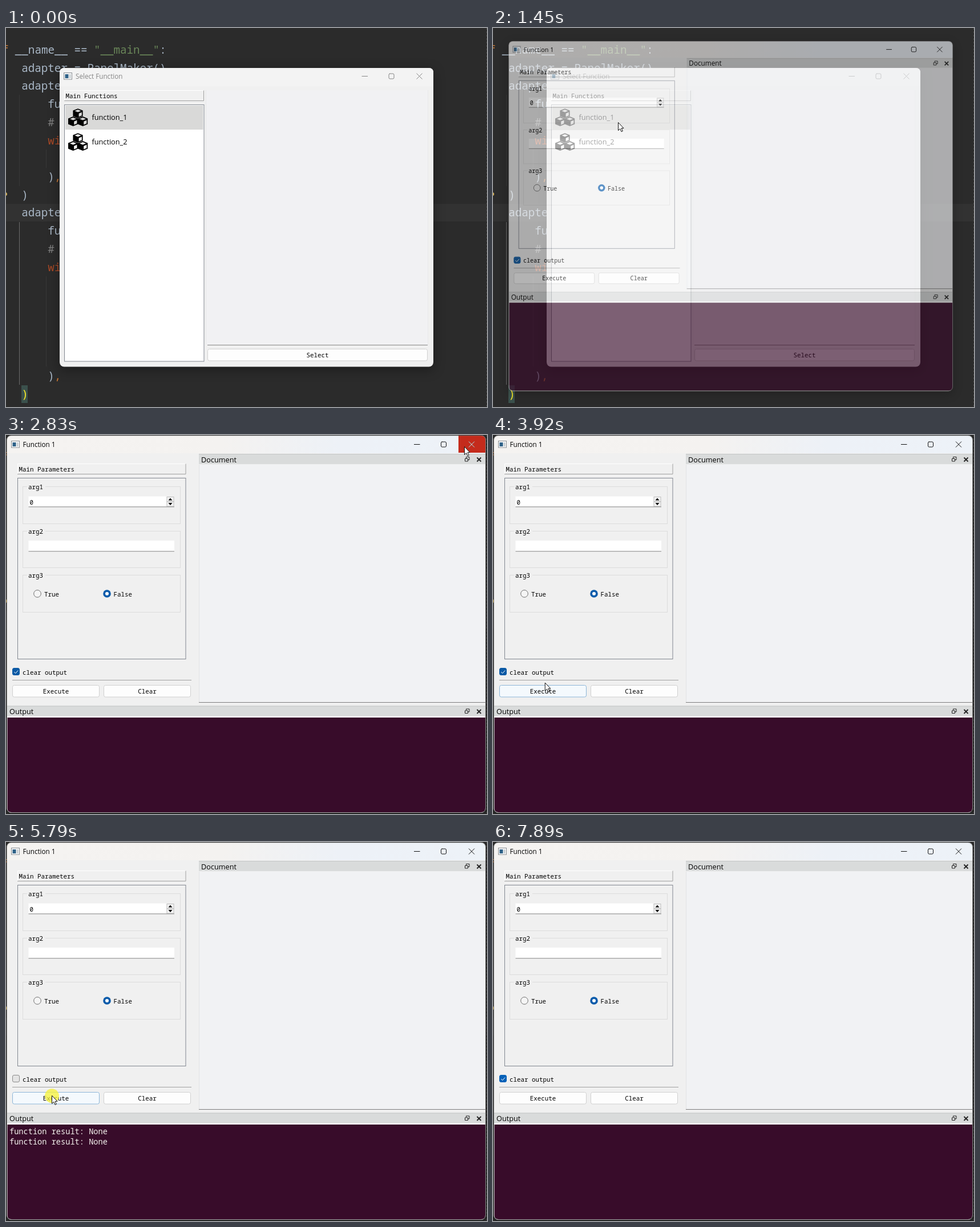
An HTML page that plays this animation: 843 px wide and 664 px high, repeating every 8 s.

```html
<!DOCTYPE html>
<html lang="en">
<head>
<meta charset="utf-8">
<title>Function picker</title>
<style>
  html, body { margin: 0; width: 100%; height: 100%; overflow: hidden; background: #2b2b2b; }
  svg { display: block; }
  text { white-space: pre; }
  .code { font: 19.2px "Noto Sans Mono", monospace; fill: #a9b7c6; }
  .mono { font: 10.83px "Noto Sans Mono", monospace; fill: #000; }
  .out { font: 13.65px "Noto Sans Mono", monospace; fill: #f4f2ee; }
  .title { font: 11.7px "Open Sans", sans-serif; }
  .ui { font: 12.7px "Open Sans", sans-serif; fill: #000; }
  .mid { text-anchor: middle; }
  .win { filter: drop-shadow(0 5px 10px rgba(0, 0, 0, .35)); }
</style>
</head>
<body>
<svg id="stage" width="843" height="664" viewBox="0 0 843 664"></svg>
<script>
const LOOP = 8000;

// ---- markup helpers ----
const rect = (x, y, w, h, fill, more = '') =>
  `<rect x="${x}" y="${y}" width="${w}" height="${h}" fill="${fill}" ${more}/>`;
const line = (d, stroke, more = '') => `<path d="${d}" fill="none" stroke="${stroke}" ${more}/>`;
const text = (x, y, cls, s, more = '') => `<text x="${x}" y="${y}" class="${cls}" ${more}>${s}</text>`;
const tint = (color, s) => `<tspan fill="${color}">${s}</tspan>`;

// ---- code editor behind the windows ----
const code = (row, col, s) => text(-18.7 + col * 11.5, 45 + row * 31.72, 'code', s);
const comma = tint('#cc7832', ',');

function editor() {
  const rows = [
    [0, 0, tint('#cc7832', 'if') + ' __name__ == ' + tint('#6a8759', '"__main__"') + ':'],
    [1, 4, 'adapter = PanelMaker()'], [2, 4, 'adapter.add('],
    [7, 8, ')' + comma], [8, 4, ')'], [9, 4, 'adapter.add('], [18, 8, ')' + comma]
  ];
  for (const r of [3, 10]) {
    rows.push([r, 8, 'func'], [r + 1, 8, tint('#808080', '#')], [r + 2, 8, tint('#aa4926', 'window')]);
  }
  return rect(0, 0, 843, 664, '#2b2b2b') + rect(0, 308, 843, 31, '#323232') +
    line('M23.5 117V277M70.5 213V245M70.5 435V593', '#373737') +
    line('M23.5 340V625', '#6b6b6b') +
    line('M842.5 0V664', '#4a4a4a', 'stroke-dasharray="3 3"') +
    '<circle cx="-1" cy="291" r="3" fill="#d8b45a"/>' +
    rect(27, 626, 11, 31, '#3b514d') +
    rows.map(r => code(...r)).join('') +
    `<g font-weight="bold">${code(19, 4, tint('#ffef28', ')'))}</g>`;
}

// ---- shared widgets ----
const appIcon = (x, y) => rect(x, y, 14, 11.5, '#f8f8f8', 'stroke="#8a8f94"') +
  rect(x + 2, y + 2.5, 6, 7, '#2f6288') + rect(x + 9.5, y + 2.5, 2.5, 7, '#c4cbd0');
const controls = (x, y) => line(
  `M${x} ${y}h10.5M${x + 48.5} ${y - 4.5}h6q2 0 2 2v5q0 2-2 2h-5q-2 0-2-2v-5q0-2 2-2` +
  `M${x + 96} ${y - 5}l10 10m0-10l-10 10`, 'currentColor');
const button = (x, y, w, label, id = '') =>
  rect(x + .5, y + .5, w - 1, 20.5, '#fdfdfd', `rx="3" stroke="#d0d0d0" id="${id}"`) +
  text(x + w / 2, y + 15, 'mono mid', label);
const panel = (x, y, w, label) =>
  line(`M${x + .5} ${y + 18}v-17.5h${w - 1}`, '#fff') +
  line(`M${x} ${y + 18.5}h${w - .5}v-18`, '#a0a0a0') + text(x + 2.5, y + 13.5, 'mono', label);

const cube = (x, y) => `<path transform="translate(${x} ${y})" fill-rule="evenodd" d="M0-8.3L8.6-5V5L0 8.6-8.6 5V-5Z
  M0-6.4L5.6-4.2 0-2-5.6-4.2ZM1.6.3L6.8-1.9V3.8L1.6 6Z"/>`;
const cubes = y => cube(126, y + 8.5) + cube(117.6, y + 22.4) + cube(134.6, y + 22.4);

// ---- "Select Function" window ----
const picker = () => `<g class="win" id="picker">
  ${rect(94, 70, 655, 523.5, '#f0f0f0', 'rx="8"')}
  <path d="M94 102V78q0-8 8-8H741q8 0 8 8V102Z" fill="#f3f3f3"/></g>
  <g id="pickerBar">${appIcon(101.5, 78.5)}
  ${text(122, 89, 'title', 'Select Function', 'fill="currentColor"')}${controls(623.5, 84.5)}</g>
  ${panel(102, 109, 245, 'Main Functions')}
  ${rect(102.5, 134.5, 244.5, 449.5, '#fff', 'stroke="#828790"')}
  ${rect(104, 136, 241.5, 42, '#d9d9d8')}
  ${cubes(141)}${cubes(184)}
  ${text(150.5, 161, 'ui', 'function_1')}${text(150.5, 204, 'ui', 'function_2')}
  ${rect(351, 109, 388, 446, '#f1f1f3')}
  ${line('M350.5 555V109M739.5 555V109', '#e9e9ea')}${line('M353 555.5H739', '#868686')}
  ${button(353, 562, 386, 'Select')}`;

// ---- "Function 1" window ----
const group = (y, h, label) => rect(29.5, y, 276, h, 'none', 'stroke="#dcdcdc"') +
  rect(37, y - 3, 32, 6, '#f0f0f0') + text(39, y + 4.5, 'mono', label);
const dock = (x, y, w, label) => rect(x, y, w, 18, '#d9dbdb') +
  line(`M${x} ${y + .5}h${w}`, '#c4c6c6') + text(x + 4, y + 14.5, 'ui', label) +
  line(`M806.5 ${y + 8}v-2.500h5.500v5h-2.500M804.5 ${y + 8.500}h5v4.500h-5Z`, '#222') +
  line(`M825.5 ${y + 6.5}l7 7m0-7l-7 7`, '#222', 'stroke-width="1.8"');

const runner = () => `<g id="runner" class="win">
  ${rect(1.5, 1, 839, 661, '#f0f0f0', 'rx="8"')}
  <path d="M1.5 32V9q0-8 8-8H832.5q8 0 8 8V32Z" fill="url(#bar)"/>
  <path id="closeHot" d="M793 31V1h39.5q8 0 8 8V31Z" fill="#c42b1c"/>
  ${appIcon(9.5, 10.5)}${text(29.5, 21, 'title', 'Function 1')}
  <g color="#111">${controls(715, 16.5)}</g>
  <path id="closeX" d="M811 11.500l10 10m0-10l-10 10" stroke="#fff"/>
  ${panel(20, 50, 295.5, 'Main Parameters')}
  ${rect(20.5, 75.5, 294.5, 317, 'none', 'stroke="#828790"')}
  ${group(90.5, 65, 'arg1')}${group(168.5, 64, 'arg2')}${group(245.5, 65, 'arg3')}
  ${rect(39.5, 107.5, 242, 18, '#fff')}${text(41.5, 121.5, 'mono', '0')}
  ${rect(282, 108.5, 12, 8, '#f5f5f5', 'stroke="#bdbdbd"')}${rect(282, 117, 12, 8, '#f5f5f5', 'stroke="#bdbdbd"')}
  <path d="M284.500 114.500l3.500-4 3.500 4ZM284.500 119l3.500 4 3.500-4Z"/>
  ${rect(39.5, 185, 255.5, 18.5, '#fff')}
  ${line('M39.5 125.9H295M39.5 203.8H295', '#868686')}
  <circle cx="55" cy="278" r="6.3" fill="#f5f5f5" stroke="#6f6f6f"/>
  <circle cx="177" cy="278" r="6.8" fill="#0b5cab"/><circle cx="177" cy="278" r="3" fill="#fff"/>
  ${text(67, 283, 'mono', 'True')}${text(188.5, 283, 'mono', 'False')}
  ${rect(11.5, 408.5, 12, 12, '#0b5aa5', 'rx="2.5" id="box"')}
  <path id="tick" d="M14.200 415l2.500 2.500 4.500-5" fill="none" stroke="#fff"/>
  ${text(29, 419.5, 'mono', 'clear output')}
  ${line('M11 429.5H325', '#a0a0a0')}
  ${button(11, 438, 153, 'Execute', 'execute')}${button(171, 438, 153, 'Clear', 'clear')}
  ${dock(338, 33, 502, 'Document')}
  ${rect(338, 52, 502, 416, '#f1f2f4')}${line('M338.5 52V468', '#e2e3e5')}
  ${line('M338 468.5H840', '#7d7d7d')}
  ${dock(2, 474.5, 838, 'Output')}
  ${rect(2, 493, 838, 2, '#fafafa')}
  <path d="M2.500 495H840V654q0 7-7 7H9.500q-7 0-7-7Z" fill="#380c2a"/>
  ${[0, 1, 2, 3, 4].map(i => text(6, 512 + i * 18, 'out', 'function result: None', `id="out${i}"`)).join('')}
  <rect x="1.5" y="1" width="839" height="660.500" rx="8" fill="none" stroke="#777" stroke-opacity=".6"/></g>`;

document.getElementById('stage').innerHTML = `<defs><linearGradient id="bar">
  <stop offset="0" stop-color="#f5f3f1"/><stop offset=".45" stop-color="#f4f2f0"/>
  <stop offset=".7" stop-color="#edf1f7"/><stop offset="1" stop-color="#edf2f8"/></linearGradient></defs>
  ${editor()}${picker()}${runner()}
  <circle id="halo" r="12.500" fill="#f7f235" fill-opacity=".75"/>
  <path id="cursor" d="M.5.5V14.500L3.800 11.500 6 16.600 8.300 15.600 6.100 10.600H10Z" fill="#fff" stroke="#111"/>`;

// ---- timing ----
const path = [ // time, x, y
  [70, 420, 655], [830, 214, 161], [1300, 216, 163], [1450, 219, 165], [1660, 296.5, 207.5],
  [1930, 296.5, 207.5], [2130, 350, 212], [2690, 802, 20], [2830, 803, 20], [3230, 803, 20],
  [3980, 78, 441], [4680, 76, 441], [4960, 50.500, 413], [5150, 50, 413.500], [5450, 80, 444],
  [6490, 80, 443], [6700, 63, 407], [6800, 64, 407.500], [7330, 200, 441],
  [7540, 205, 443], [7860, 843, 124]
];
const clicks = [[850, 960], [1080, 1190], [4050, 4210], [5020, 5130], [5480, 5590],
  [5750, 5870], [6000, 6120], [6260, 6380], [6640, 6770], [7420, 7540]];
const printed = [4180, 5560, 5830, 6080, 6340];
const CLEARED = 7500;

const within = (t, spans) => spans.some(([a, b]) => t >= a && t < b);

function pointer(t) {
  const i = path.findIndex(k => k[0] > t);
  if (i < 1) return null;
  const [t0, x0, y0] = path[i - 1], [t1, x1, y1] = path[i];
  const p = (t - t0) / (t1 - t0), e = p * p * (3 - 2 * p);
  return [x0 + (x1 - x0) * e, y0 + (y1 - y0) * e];
}

const el = id => document.getElementById(id);
const set = (id, attrs) => { for (const k in attrs) el(id).setAttribute(k, attrs[k]); };
const show = (id, on) => set(id, { visibility: on ? 'visible' : 'hidden' });
const hover = (id, on) => set(id, { fill: on ? '#f4f9fd' : '#fdfdfd', stroke: on ? '#8db6d8' : '#d0d0d0' });

function draw(t) {
  set('pickerBar', { color: within(t, [[850, 1380]]) ? '#111' : '#868686' });

  // window opens: fades in while growing
  const p = Math.min(1, Math.max(0, (t - 1380) / 240));
  const open = 1 - (1 - p) ** 3, s = .792 + .208 * open;
  set('runner', { opacity: open, transform: `translate(${360 * (1 - s)} ${307 * (1 - s)}) scale(${s})` });

  const at = pointer(t);
  show('cursor', at);
  show('halo', at && within(t, clicks));
  if (at) {
    set('cursor', { transform: `translate(${at})` });
    set('halo', { cx: at[0] + .5, cy: at[1] + 1 });
  }

  const onClose = at && t > 1930 && at[0] > 793 && at[1] < 31;
  show('closeHot', onClose);
  show('closeX', onClose);
  hover('execute', within(t, [[3850, 5000], [5380, 6600]]));
  hover('clear', within(t, [[7360, 7640]]));

  const checked = !within(t, [[5110, 6770]]);
  set('box', checked
    ? { fill: t < 4900 ? '#0b5aa5' : '#0561b8', stroke: t < 4900 ? '#0b5aa5' : '#0561b8' }
    : { fill: '#e4e4e4', stroke: '#8c8c8c' });
  show('tick', checked);
  printed.forEach((from, i) => show('out' + i, t >= from && t < CLEARED));
}

function tick(now) {
  draw(now % LOOP);
  requestAnimationFrame(tick);
}
draw(0);
requestAnimationFrame(tick);
</script>
</body>
</html>
```
